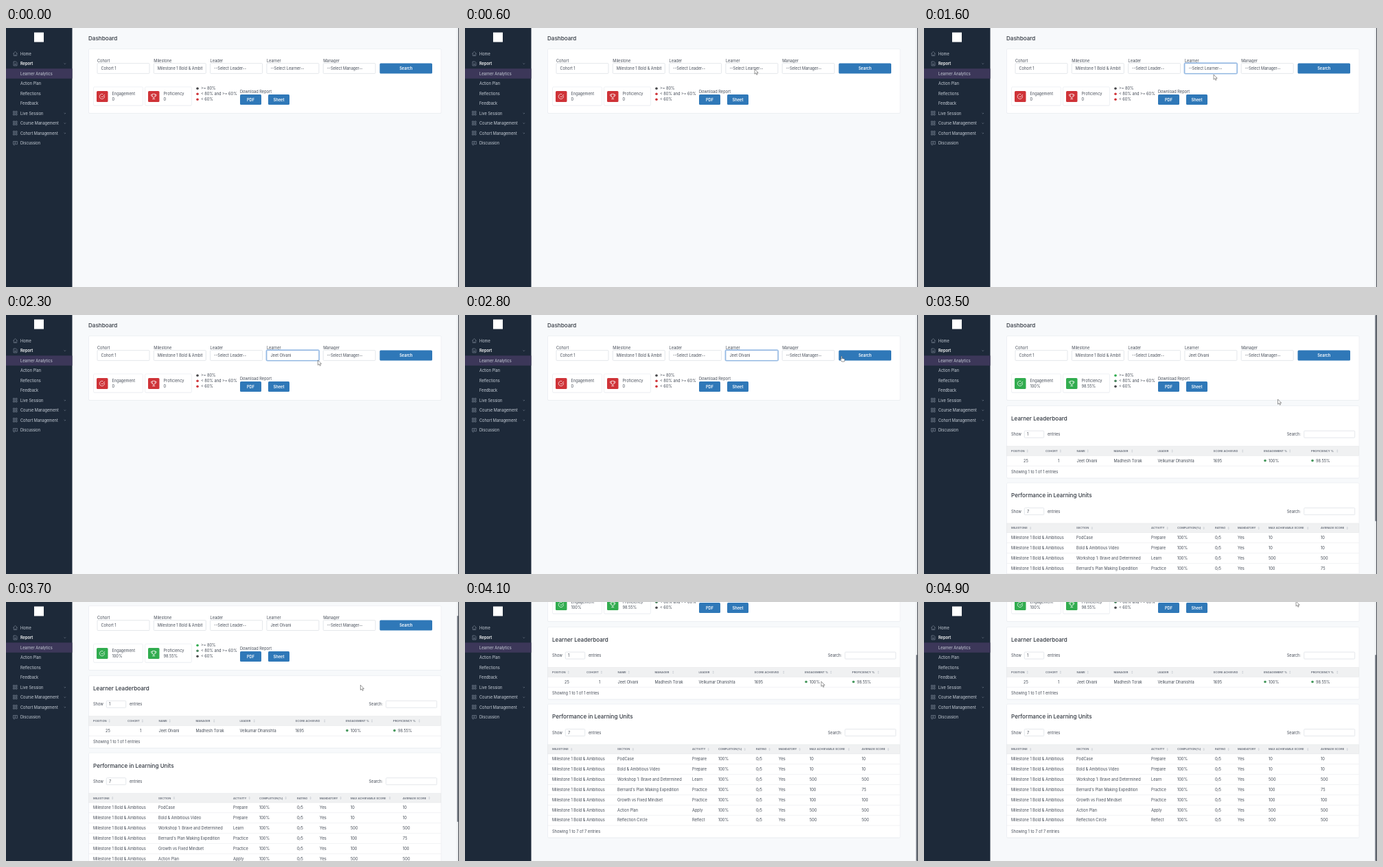
Animation, 660 px wide and 378 px high, one loop 5400 ms. Source, as an HTML page:

```html
<!DOCTYPE html>
<html lang="en">
<head>
<meta charset="utf-8">
<title>Dashboard</title>
<style>
html, body { margin: 0; width: 100%; height: 100%; overflow: hidden; background: #f7f9fb; }
svg { display: block; width: 660px; height: 378px; }
text { font: 5.65px Inter, Roboto, sans-serif; fill: #444b56; }
.title { font-size: 8.1px; font-weight: 500; fill: #30363f; }
.head { font-size: 4.1px; font-weight: 600; fill: #626975; }
.nav { fill: #cbd2db; }
.on { fill: #fff; font-weight: 600; }
.btn { fill: #fff; font-weight: 600; text-anchor: middle; }
.line { fill: none; stroke: #8792a1; stroke-width: .6; }
.mark { fill: none; stroke: #fff; stroke-width: .7; }
.sort { fill: #c3c8cf; }
</style>
</head>
<body>
<svg id="stage" viewBox="0 0 660 378"></svg>
<script>
const LOOP = 5400, RESULT = 3000, SCROLL = 96;
const LEARNER = 'Jeet Olvani', MILESTONE = 'Milestone 1 Bold &amp; Ambitious';
const RED = '#cf3338', GREEN = '#31ac4f', BLUE = '#2f78b8', DARK = '#4a4a4c';

// y is the middle of the capital letters
const text = (x, y, s, cls = '', size = 5.65) =>
  `<text x="${x}" y="${y + size * .36}" class="${cls}">${s}</text>`;
const rect = (x, y, w, h, fill, more = '') =>
  `<rect x="${x}" y="${y}" width="${w}" height="${h}" fill="${fill}" ${more}/>`;
const path = (d, cls = 'line') => `<path d="${d}" class="${cls}"/>`;
const dot = (x, y, fill) => `<circle cx="${x}" cy="${y}" r="1.8" fill="${fill}"/>`;
const group = (id, body) => `<g id="${id}">${body}</g>`;
const card = (x, y, w, h) =>
  rect(x, y + .5, w, h, '#e9ecf0', 'rx="1.5"') +
  rect(x, y, w, h, '#fff', 'rx="1.5" stroke="#eaedf1" stroke-width=".7"');
const input = (x, y, w, h) => rect(x, y, w, h, '#fff', 'rx="1" stroke="#dde1e6" stroke-width=".8"');
const button = (x, y, w, h, s) =>
  rect(x, y, w, h, BLUE, 'rx="1.5"') + text(x + w / 2, y + h / 2, s, 'btn');

function sidebar() {
  const items = ['Home', 'Report', 'Learner Analytics', 'Action Plan', 'Reflections', 'Feedback',
    'Live Session', 'Course Management', 'Cohort Management', 'Discussion'];
  const grid = [0, 3.4].map(a => [0, 3.4].map(b => `M${10.5 + a} ${-3 + b}h2.2v2.2h-2.2z`).join('')).join('');
  const icons = {
    0: 'M10.3 0 13.5-3 16.7 0M11.3-.5V3h4.4V-.5M13.5 3V1',
    1: 'M11-3h3.5l1.5 1.5V3h-5zM12.3 0h2.4M12.3 1.5h2.4',
    6: grid, 7: grid, 8: grid,
    9: 'M10.5-2.5h6v4.2h-3.3l-1.5 1.5V1.7h-1.2zM12-.9h3M12 .4h2'
  };
  let out = rect(0, 0, 96.5, 378, '#1d2939') + rect(41, 6.5, 14, 14, '#fff') +
    rect(0, 59.3, 96.5, 14.5, '#3c3759');
  items.forEach((s, i) => {
    const y = 37.5 + i * 14.5;
    out += text(21, y, s, i === 1 ? 'on' : 'nav');
    if (icons[i]) out += `<g transform="translate(0 ${y})">${path(icons[i])}</g>`;
    if ([1, 6, 7, 8].includes(i)) out += path(`M84.6 ${y - .5}l1.2 1.2 1.2-1.2`);
  });
  return out;
}

function filters() {
  const fields = [['Cohort', 'Cohort 1'], ['Milestone', 'Milestone 1 Bold &amp; Ambit'],
    ['Leader', '--Select Leader--'], ['Learner', ''], ['Manager', '--Select Manager--']];
  return text(120, 15, 'Dashboard', 'title', 8.1) + card(120.5, 30.5, 513.5, 94) +
    fields.map(([label, value], i) => {
      const x = 133 + i * 82.3;
      return text(x, 47.5, label) + input(x, 51.6, 76, 14.8) + text(x + 5.5, 59, value);
    }).join('') +
    group('focus', rect(379.5, 51.2, 76.6, 15.4, '#fff', 'rx="1.5" stroke="#a9c8ec" stroke-width="2"') +
      rect(379.9, 51.6, 76, 14.8, '#fff', 'rx="1" stroke="#77a4d8" stroke-width=".8"')) +
    group('prompt', text(385.4, 59, '--Select Learner--')) +
    group('chosen', text(385.4, 59, LEARNER)) +
    button(544.5, 51.5, 76.5, 15, 'Search') +
    text(341, 93.3, 'Download Report') +
    button(341, 97, 31, 15, 'PDF') + button(382, 97, 31, 15, 'Sheet');
}

function score(x, w, label, value, colour, icon) {
  return card(x, 86, w, 27) + rect(x + 4.5, 92, 16.5, 16, colour, 'rx="1.5"') +
    `<g transform="translate(${x + 12.7} 100)">${path(icon, 'mark')}</g>` +
    text(x + 27, 96.3, label) + text(x + 27, 104.2, value);
}

function summary(values, colour, dots) {
  const check = 'M3.2-.8A3.6 3.6 0 1 1 1.2-3.3M-1.5-.4 0 1.1 3.8-3';
  const cup = 'M-2-3.7h4v3a2 2 0 0 1-4 0zM-2-2.7h-1.8c0 2 .8 2.6 2 2.8M2-2.7h1.8c0 2-.8 2.6-2 2.8M0 1.3v2.2M-2 3.6h4';
  const legend = ['&gt;= 80%', '&lt; 80% and &gt;= 60%', '&lt; 60%'];
  return score(127.5, 72, 'Engagement', values[0], colour, check) +
    score(202.5, 68, 'Proficiency', values[1], colour, cup) +
    legend.map((s, i) => dot(279, 88.2 + i * 8, dots[i]) + text(284, 88.2 + i * 8, s)).join('');
}

// columns: [x, label, x of the sort arrows]; rows: lists of cells
function table(top, title, columns, rows, cellX) {
  const n = rows.length, pitch = 14.9, first = top + 80;
  const end = first + (n - 1) * pitch;
  let out = card(120.5, top, 513.5, end + 25.5 - top) +
    text(127, top + 18.5, title, 'title', 8.1) +
    text(127, top + 41.5, 'Show') + input(146.3, top + 36.6, 28.4, 10) +
    text(150, top + 41.5, n) + text(180, top + 41.5, 'entries') +
    text(528.7, top + 41.5, 'Search:') + input(553.7, top + 36.6, 74, 10) +
    rect(120.4, top + 59, 513.2, 13.8, '#f0f1f2', 'stroke="#e3e5e8" stroke-width=".5"');
  for (const [x, label, sort] of columns) {
    const y = top + 66;
    out += text(x, y, label, 'head', 4.1) +
      path(`M${sort} ${y - .5}l1.2-1.6 1.2 1.6zm0 1l1.2 1.6 1.2-1.6z`, 'sort');
  }
  rows.forEach((row, i) => {
    const y = first + i * pitch;
    row.forEach((s, k) => out += text(cellX[k], y, s));
    out += rect(120.4, y + 7.4, 513.2, .5, '#e4e7ea');
  });
  return out + text(127, end + 16.5, `Showing 1 to ${n} of ${n} entries`);
}

function results() {
  const people = [[127, 'POSITION', 149.5], [177, 'COHORT', 197.7], [222.5, 'NAME', 237.5],
    [276.5, 'MANAGER', 302], [340.5, 'LEADER', 360.5], [421.5, 'SCORE ACHIEVED', 463],
    [495, 'ENGAGEMENT %', 532], [564, 'PROFICIENCY %', 601]];
  const units = [[127, 'MILESTONE', 154], [222, 'SECTION', 243.7], [331, 'ACTIVITY', 353.5],
    [369, 'COMPLETION(%)', 406.5], [424, 'RATING', 442.5], [457, 'MANDATORY', 486.5],
    [502, 'MAX ACHIEVABLE SCORE', 558], [578, 'AVERAGE SCORE', 615.5]];
  const rows = [['PodCase', 'Prepare', 10, 10], ['Bold &amp; Ambitious Video', 'Prepare', 10, 10],
    ['Workshop 1: Brave and Determined', 'Learn', 500, 500],
    ["Bernard's Plan Making Expedition", 'Practice', 100, 75],
    ['Growth vs Fixed Mindset', 'Practice', 100, 100],
    ['Action Plan', 'Apply', 500, 500], ['Reflection Circle', 'Reflect', 500, 500]]
    .map(([name, kind, max, mean]) => [MILESTONE, name, kind, '100%', '0/5', 'Yes', max, mean]);
  return table(132.5, 'Learner Leaderboard', people,
      [[25, 1, LEARNER, 'Madhesh Torak', 'Velkumar Dhanishta', 1695, '100%', '98.55%']],
      [145, 195, 222.5, 276.5, 340.5, 421.5, 502, 571]) +
    dot(497, 212.5, '#46985d') + dot(566, 212.5, '#46985d') +
    table(245, 'Performance in Learning Units', units, rows, units.map(c => c[0]));
}

const $ = id => document.getElementById(id);
$('stage').innerHTML = rect(0, 0, 660, 378, '#f7f9fb') +
  group('page', filters() +
    group('before', summary([0, 0], RED, [DARK, RED, RED])) +
    group('after', summary(['100%', '98.55%'], GREEN, [GREEN, '#46805a', DARK]) + results())) +
  sidebar() + rect(657.5, 0, 1, 378, '#d3d7dc') + rect(659, 0, 1, 378, '#4a4e55') +
  group('thumb', rect(657, 0, 2, 301, '#7f858e', 'rx="1"')) +
  group('arrow', '<path d="M0 0v7.2l1.7-1.5 1.2 2.6 1.2-.6-1.1-2.4h2.2z" fill="#fff" stroke="#444" stroke-width=".55"/>') +
  group('hand', '<path d="M1 .8c0-1 1.4-1 1.4 0v2.5l3 .6c.7.2.9.6.8 1.3L5.7 8H2L-.2 5.1c-.4-.7.4-1.2.9-.7l.5.5z" fill="#fff" stroke="#444" stroke-width=".55"/>');

// [time, x, y]
const pointer = [[300, 520, 59], [600, 422, 60], [1000, 422, 60], [1400, 422, 68], [2100, 422, 68],
  [2700, 547, 60], [3000, 547, 60], [3500, 515.5, 123], [4100, 519, 116], [4300, 519, 116], [4900, 542, -1]];
const scroll = [[3500, 0], [4100, SCROLL]];

function at(keys, t) {
  const i = keys.findIndex(k => k[0] > t);
  if (i < 0) return keys[keys.length - 1].slice(1);
  if (i === 0) return keys[0].slice(1);
  const a = keys[i - 1], b = keys[i], u = (t - a[0]) / (b[0] - a[0]);
  const ease = u * u * (3 - 2 * u);
  return a.slice(1).map((v, k) => v + (b[k + 1] - v) * ease);
}
const show = (id, on) => $(id).setAttribute('display', on ? 'inline' : 'none');
const move = (id, x, y) => $(id).setAttribute('transform', `translate(${x} ${y})`);

function draw(now) {
  const t = Math.floor(now % LOOP / 100) * 100; // ten pictures a second
  const [x, y] = at(pointer, t), [top] = at(scroll, t);
  const done = t >= RESULT, picked = t >= 2200, overButton = t >= 2700 && t < 3100;
  show('focus', t >= 800 && !done);
  show('prompt', !picked);
  show('chosen', picked);
  show('before', !done);
  show('after', done);
  show('thumb', done);
  show('arrow', t >= 300 && !overButton);
  show('hand', overButton);
  move('page', 0, -top);
  move('thumb', 0, top * 77 / SCROLL);
  move('arrow', x, y);
  move('hand', x, y);
}

let start;
function tick(now) {
  start ??= now;
  draw(now - start);
  requestAnimationFrame(tick);
}
draw(0);
requestAnimationFrame(tick);
</script>
</body>
</html>
```
